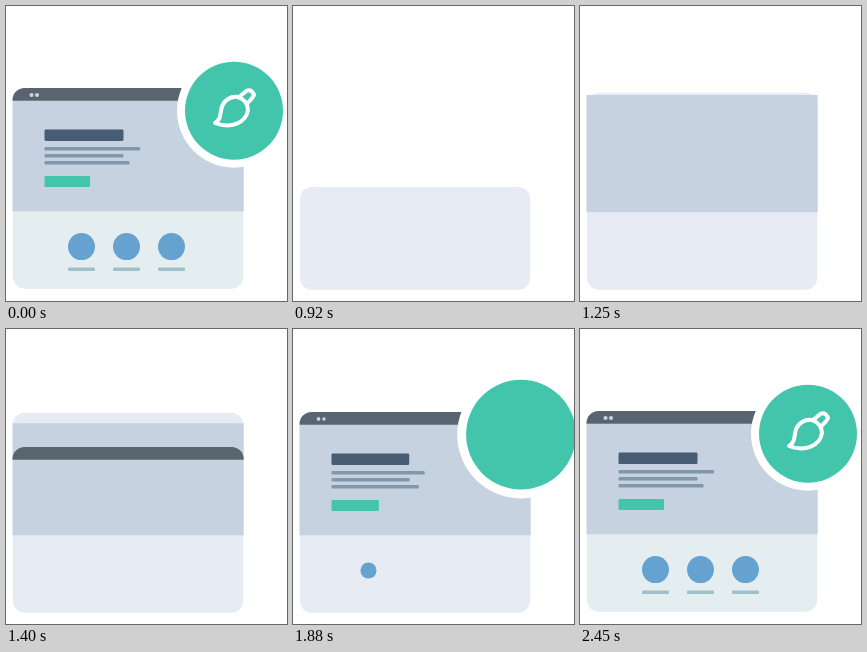
These frames come from a looping animation (281x295 px, 3020 ms). An HTML page with a canvas:

```html
<!DOCTYPE html>
<html lang="en">
<head>
<meta charset="utf-8">
<title>Page builder</title>
<style>
html, body { margin: 0; width: 100%; height: 100%; overflow: hidden; background: #fff; }
canvas { display: block; width: 281px; height: 295px; }
</style>
</head>
<body>
<canvas id="stage"></canvas>
<script>
const W = 281, H = 295, LOOP = 3020, CLEAR = 800, DONE = 2450, STEP = 30;
const canvas = document.getElementById('stage');
const ctx = canvas.getContext('2d');
const dpr = window.devicePixelRatio || 1;
canvas.width = Math.round(W * dpr);
canvas.height = Math.round(H * dpr);

const TEAL = '#43c5ac';
const HERO = '#c6d2e0';

// x, y, width, height, colour, start time; each grows from its left end
const bars = [
  [38.5, 123.5, 79, 11.5, '#475d74', 1521],
  [38.5, 141, 95.5, 3.6, '#8197ab', 1534],
  [38.5, 148, 79, 3.6, '#8197ab', 1512],
  [38.5, 155, 85, 3.6, '#8197ab', 1599],
  [38.5, 170, 45.5, 11, TEAL, 1655]
];

// centre x, circle start, caption start
const features = [
  [75.5, 1853, 1955],
  [120.5, 1949, 2023],
  [165.5, 2023, 2043]
];

const bristles = new Path2D(
  'M209 117C214 114 214 110 215 105C216 95 224 90 232 91' +
  'C238 93 242 98 242 104C240 117 225 123 209 117Z');
const handle = new Path2D('M233 91L241 84.5Q245 83 248 88.5Q248 91 240.5 98');

let now = 0;

// Elastic ease-out: 0 before the start, overshoots, then settles at 1
function spring(start, period = 170, decay = 0.0107, time = now) {
  const t = time - start;
  return t <= 0 ? 0 : 1 - Math.exp(-decay * t) * Math.cos(2 * Math.PI * t / period);
}

function box(x, y, w, h, radius, fill) {
  if (w <= 0 || h <= 0) return;
  ctx.fillStyle = fill;
  ctx.beginPath();
  ctx.roundRect(x, y, w, h, radius);
  ctx.fill();
}

function disc(x, y, r, fill) {
  if (r <= 0) return;
  ctx.fillStyle = fill;
  ctx.beginPath();
  ctx.arc(x, y, r, 0, 2 * Math.PI);
  ctx.fill();
}

function drawHero() {
  const start = 988, bottom = 205.3, full = 110.8;
  const s = spring(start);
  if (!s) return;
  const blur = Math.max(0, s - spring(start, 170, 0.0107, now - 7)) * full;
  const soft = Math.min(blur, 14);
  const top = bottom - s * full;
  let fill = HERO;
  if (soft > 2) {
    fill = ctx.createLinearGradient(0, top - soft / 2, 0, top + soft / 2);
    fill.addColorStop(0, HERO + '00');
    fill.addColorStop(1, HERO);
  }
  const y = soft > 2 ? top - soft / 2 : top;
  box(6.5, y, 231.2, bottom - y, 0, fill);
}

function drawTitleBar() {
  const s = spring(1330);
  if (!s) return;
  box(6.5, 82 - 87 * (1 - s), 231.2, 12.8, [12, 12, 0, 0], '#5a646f');
  [[25.5, 1690], [31, 1720]].forEach(([x, at]) => disc(x, 89, 2.1 * spring(at), '#c9d4e0'));
}

function drawBadge() {
  const s = spring(1730, 220, 0.0083);
  disc(228, 104.7, 57 * s, '#fff');
  disc(228, 104.7, 49 * s, TEAL);
  const k = spring(1900);
  if (k <= 0) return;
  ctx.save();
  ctx.translate(228.5, 102);
  ctx.scale(k, k);
  ctx.translate(-228.5, -102);
  ctx.strokeStyle = '#fff';
  ctx.lineWidth = 4;
  ctx.lineJoin = ctx.lineCap = 'round';
  ctx.stroke(bristles);
  ctx.stroke(handle);
  ctx.restore();
}

function draw(time) {
  const settled = time < CLEAR || time >= DONE;
  now = settled ? 1e5 : CLEAR + Math.floor((time - CLEAR) / STEP) * STEP;
  ctx.setTransform(dpr, 0, 0, dpr, 0, 0);
  ctx.fillStyle = '#fff';
  ctx.fillRect(0, 0, W, H);
  if (!settled) ctx.translate(0, 0.9);

  // The card stays inside the bar's rounded corners once that has landed
  const tall = 200.8 * spring(896);
  box(7, 282.8 - tall, 230.2, tall, 12, settled ? '#e4edef' : '#e6ebf4');
  drawHero();
  drawTitleBar();

  for (const [x, y, w, h, fill, at] of bars) box(x, y, w * spring(at), h, 1.2, fill);
  for (const [x, dotAt, lineAt] of features) {
    disc(x, 240.6, 13.5 * spring(dotAt), '#65a2d0');
    const w = 27 * spring(lineAt);
    box(x - w / 2, 261.4, w, 3.6, 1.2, settled ? '#9fbfc9' : '#a0b8cb');
  }
  drawBadge();
}

const begin = performance.now();
function tick() {
  draw((performance.now() - begin) % LOOP);
  requestAnimationFrame(tick);
}
tick();
</script>
</body>
</html>
```
